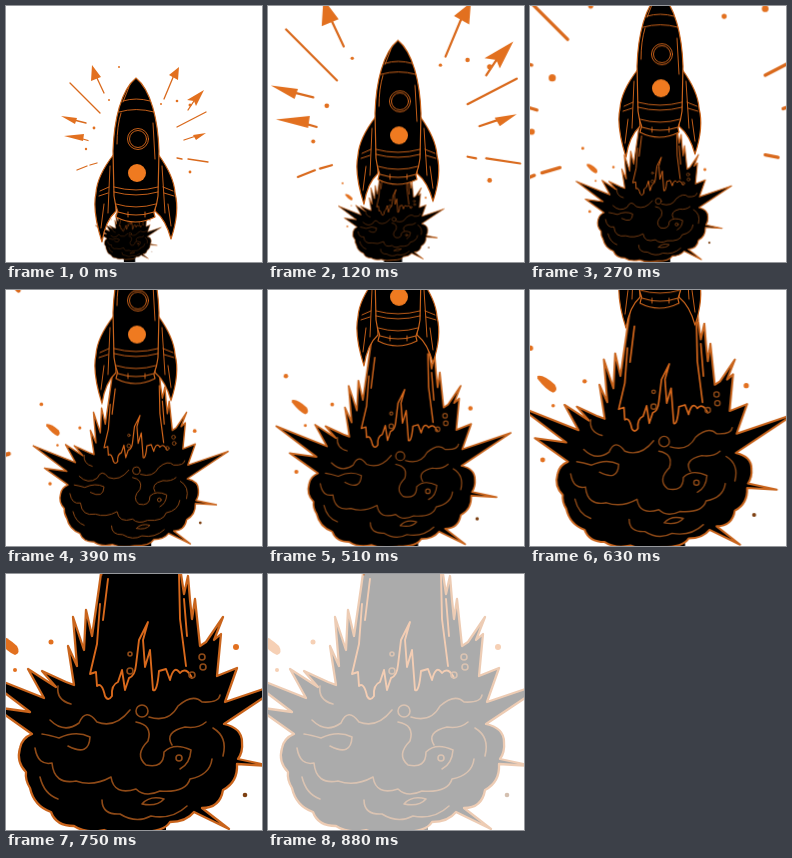
Recreate the animation shown at these times as an HTML page. Size 256 by 256 pixels, loop 0.91 s.

```html
<!DOCTYPE html>
<html lang="en">
<head>
<meta charset="utf-8">
<title>Rocket launch</title>
<style>
  html, body { margin: 0; width: 100%; height: 100%; overflow: hidden; background: #fff; }
  svg { display: block; width: 100vw; height: 100vh; }
  .line { fill: none; stroke: #d9691c; stroke-linecap: round; stroke-linejoin: round; }
  .solid { fill: #000; stroke: #c9641c; stroke-linejoin: round; }
  .curls { stroke: #8f4a17; }
  .spark { fill: #e2701f; }

  /* 25 steps of 30 ms, then a hold */
  .rocket, .smoke, .burst { animation: 910ms steps(25, end) infinite; }
  .rocket { animation-name: rise; }
  .smoke { animation-name: swell; transform-origin: 121px 252px; }
  .burst { animation-name: spread; transform-origin: 130px 154px; }
  .fade { animation: fade 910ms step-end infinite; }

  @keyframes rise {
    0% { transform: translateY(0); }
    82.418%, 100% { transform: translateY(-235.5px); }
  }
  @keyframes swell {
    0% { transform: scale(.21); }
    82.418%, 100% { transform: scale(1); }
  }
  @keyframes spread {
    0% { transform: scale(1); }
    82.418%, 100% { transform: scale(5.35); }
  }
  @keyframes fade {
    0% { opacity: 1; }
    93.407% { opacity: .667; }
    96.703%, 100% { opacity: .333; }
  }
</style>
</head>
<body>
<svg viewBox="0 0 256 256">
  <g class="burst">
    <path class="line" stroke-width="1.3" d="M90 70L98 87M64 77L94 107M64 113L80 117M70 131L82 134.5
      M71 164L81 160M84 159L91 157M168 69L158 93M190 92L182 104M171 121L200 106M190 130L178 134
      M171 152L176 153M182 153L202 156"/>
    <path class="spark" d="M86 59L95 71L85 75ZM173 61L172 74L163 69ZM198 84L190 100L188 95L181 94Z
      M55 110L71 112L69 118ZM58 130L78 128L77 135ZM200 127L190 134L187 129Z"/>
    <g class="spark">
      <circle cx="113" cy="61" r="1"/>
      <circle cx="103" cy="94" r="1"/>
      <circle cx="88" cy="122" r="1.4"/>
      <circle cx="80" cy="143" r="1.2"/>
      <circle cx="155" cy="98" r="1"/>
      <circle cx="171" cy="95" r="1.3"/>
      <circle cx="184" cy="99" r="1.5"/>
      <circle cx="184" cy="166" r="1.4"/>
    </g>
  </g>

  <g class="fade">
    <g class="smoke">
      <path d="M106 240H160V330H106Z"/>
      <path class="solid" stroke-width="2.3" d="M99 -30H172L175 0L178 20L182 2L184 26L186 45L189 25L194 72L200 68L217 43
        L208 66L215 60L211 102L231 94L219 128L284 106L218 150Q236 154 236 168Q237 178 232 185L265 192L231 190
        Q232 208 217 216Q214 234 196 234L223 255L188 238Q180 248 164 248Q158 258 134 258
        Q112 262 98 256Q80 260 68 252Q50 252 45 238Q28 232 24 214Q19 206 20 198Q10 188 14 174Q16 164 26 160
        L-12 133L24 138L-30 97L38 124L22 95L50 113L36 97L60 108L68 111L62 72L71 92L67 43L78 76L80 36L86 62L93 14Z"/>
      <path class="line" stroke="#c9641c" stroke-width="1.9" d="M102 5L97 46M94 30L91 70L84 100L90 98L91 112Q96 108 99 122
        Q102 128 106 122Q105 111 112 108L116 96L119 116L123 104Q129 102 130 91L133 66L142 48L137 66L139 93L144 76
        L147 116Q151 119 153 97L160 95L164 106Q168 90 174 99Q180 92 186 104M173 0L174 45L180 92M178 25L181 62"/>
      <g class="line curls" stroke-width="1.6">
        <path d="M44 146Q58 160 73 149Q80 133 91 148Q109 155 124 136M52 112Q50 126 65 130
          M130 148Q147 151 142 167Q128 181 140 191Q158 195 158 178Q168 168 185 176Q184 190 174 195"/>
        <path d="M143 143Q163 149 172 132Q187 119 196 128Q213 129 214 121M166 171Q158 158 179 153
          Q192 155 200 148M62 172Q83 183 84 163Q70 156 53 164Q43 161 36 160"/>
        <path d="M29 174Q32 192 46 189Q48 211 70 207Q87 213 105 203Q108 222 130 215Q139 224 154 217
          Q180 219 184 205Q204 201 206 185M96 226Q96 241 114 240Q130 250 145 242Q166 246 181 232
          M207 154Q222 163 217 182M136 230Q144 221 158 225Q151 233 136 230M34 203Q38 220 52 225"/>
        <circle cx="136" cy="137" r="6"/>
        <circle cx="173" cy="184" r="3"/>
        <circle cx="196" cy="83" r="3"/>
        <circle cx="197" cy="93" r="3"/>
        <circle cx="186" cy="101" r="3"/>
        <circle cx="124" cy="80" r="2"/>
        <circle cx="124" cy="97" r="3"/>
      </g>
      <g class="spark">
        <path d="M-9 62Q-2 60 11 72Q15 79 9 81Q1 78 -9 65Z"/>
        <circle cx="45" cy="68" r="2.5"/>
        <circle cx="9" cy="96" r="2"/>
        <circle cx="-17" cy="30" r="3"/>
        <circle cx="-3" cy="158" r="2.8"/>
        <circle cx="230" cy="73" r="3"/>
        <circle cx="239" cy="221" r="2.3" fill="#7d4012"/>
      </g>
    </g>
  </g>

  <g class="rocket">
    <g class="solid" stroke-width="1.2">
      <path d="M108 148Q91 170 90 187Q86 205 96 236Q99 215 110 205Z"/>
      <path d="M152 148Q168 170 169 187Q174 206 165 233Q160 214 149 205Z"/>
      <path d="M112 203L110 211Q129 221 149 211L147 203Z"/>
      <path d="M130 72C115 84 108 114 107 145L108 190Q109 199 112 206Q130 212 148 206Q151 199 152 190L153 145
        C152 114 145 84 130 72Z"/>
    </g>
    <g class="line" stroke-width=".9">
      <path d="M117 95Q130 91 144 95M113 106Q130 101 148 106M123 81L117 96M115 107Q111 120 111 138M147 117L149 153"/>
      <path d="M108 181Q130 187 152 181M108 186Q130 192 152 186M110 198Q130 204 150 198M122 206V211M139 206V211"/>
      <path d="M104 160L102 207M94 185L103 181M93 190L102 187M95 222L98 198M156 160L159 207M167 185L157 181
        M168 190L158 187M165 220L162 198"/>
      <circle cx="132" cy="133" r="10.5"/>
      <circle cx="132" cy="133" r="8.5"/>
    </g>
    <circle cx="131" cy="167" r="9" fill="#ef7a20"/>
  </g>
</svg>
</body>
</html>
```
